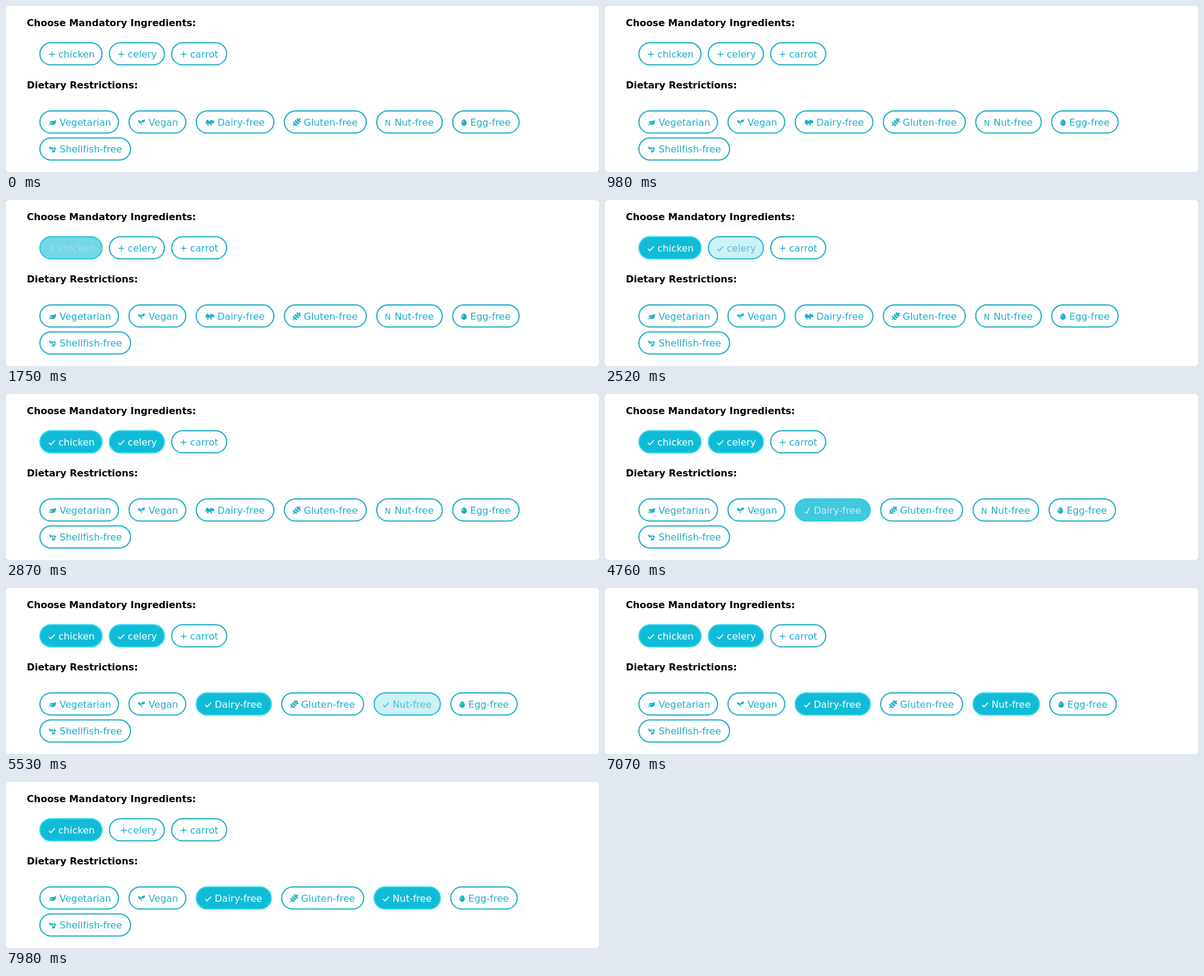
Write an HTML page that moves like this. It is 996 px wide and 280 px high and loops after 8 s.

```html
<!DOCTYPE html>
<html lang="en">
<head>
<meta charset="utf-8">
<title>Recipe filters</title>
<style>
  html, body { margin: 0; width: 100%; height: 100%; overflow: hidden; background: #999; }
  svg { display: block; width: 996px; height: 280px; }
  text { font: 16px "DejaVu Sans", Verdana, sans-serif; font-variant-ligatures: none; fill: currentColor; }
  .heading { font-weight: bold; fill: #000; }
  .icon { fill: currentColor; }
  .line { fill: none; stroke: currentColor; stroke-width: 1.3; }
</style>
</head>
<body>
<svg id="stage" viewBox="0 0 996 280">
  <rect width="996" height="280" rx="3" fill="#fff"/>
  <text class="heading" x="35" y="34">Choose Mandatory Ingredients:</text>
  <text class="heading" x="35" y="139">Dietary Restrictions:</text>
</svg>
<script>
const LOOP = 8000, STEP = 70;
const BLUE = [30, 174, 200], FILL = [16, 187, 214], GLOW = [50, 214, 238], WHITE = [255, 255, 255];
const PLUS = '<path class="line" d="M-5 0H5M0-5V5"/>';
const CHECK = '<path class="line" style="stroke-width:1.6" d="M-5 .8L-1.8 4L5-3.2"/>';

const grain = (x, y, turn) =>
  `<ellipse rx="2.5" ry="1.35" transform="translate(${x} ${y}) rotate(${turn})"/>`;

const ICONS = {
  plus: PLUS,
  leaf: '<path d="M5.7-4.8C6.6 1 4 4.2 0 4.2Q-2.4 4.2-3.6 3L-5.4 5-6.2 4.2Q-4 1 1.6.2Q-2.4-.3-4.9 1.4Q-5-2.4-.4-2.6Q4.2-2.4 5.7-4.8Z"/>',
  sprout: '<path d="M-6-3.8Q-.2-3.8 .6 1.2V5H-.7V1.3Q-5.8 1-6-3.8ZM6-5Q5.8-.2 1.2 .3Q.8-1.4-.5-2.5Q1-5 6-5Z"/>',
  cow: '<path d="M-5-4.6H2.6L4-3.6 6-3.8 7.5-.6 6.8 1.2H4.6L3.2 0V5H1V2.2H-2.4V5H-4.6V.8L-6 2.2H-7.2Q-7.2-4-5-4.6Z"/><path fill="#fff" d="M-2.4-4.6Q-2.4-2-.6-2T1-4.6Z"/>',
  wheat: '<path class="line" d="M-6 6L4-4"/>' + [-2.6, .4, 3.4].map(k =>
    grain(k - 1.7, -k - 1.7, 80) + grain(k + 1.7, -k + 1.7, 10)).join('') + grain(4.8, -4.8, -45),
  nut: '<text x="-6" y="5" style="font-size:13.5px">N</text>',
  egg: '<path d="M0-5.2C2.6-5.2 4.6-1.2 4.6 1.2A4.6 4.2 0 0 1-4.6 1.2C-4.6-1.2-2.6-5.2 0-5.2Z"/><path d="M-2.5 .8Q-2.2-2-.4-2.8" fill="none" stroke="#fff"/>',
  shrimp: '<path d="M-6-5H-4.8Q-4.6-3.8-3.4-3.8H1V.2H-1.5Q-5.2 0-6-5ZM2-3.8Q6.3-3.4 6-.2L2.4 .6ZM2 1.6L5.4 1Q4.4 4.8 .6 5.2L-1.8 3.6 .4 3.2-1.4 1.4Z"/><circle cx="-1.2" cy="-1.9" r=".8" fill="#fff"/>'
};

// w: width, tx: label offset, ix: icon offset; on/off: toggle times
const chip = (label, icon, w, tx, ix, extra) => ({ label, icon, w, tx, ix, ...extra });
const rows = [
  { y: 61, gap: 10.3, chips: [
    chip('chicken', 'plus', 106.3, 32, 21, { on: 1615 }),
    chip('celery', 'plus', 94.4, 32, 21, { on: 2455, off: 7780 }),
    chip('carrot', 'plus', 94.4, 32, 21)
  ]},
  { y: 176, gap: 15.6, chips: [
    chip('Vegetarian', 'leaf', 134, 34, 22),
    chip('Vegan', 'sprout', 97.3, 34, 22),
    chip('Dairy-free', 'cow', 132.4, 36.5, 24, { on: 4560, wOn: 128 }),
    chip('Gluten-free', 'wheat', 139.6, 33.5, 21.5),
    chip('Nut-free', 'nut', 112, 31, 20.5, { on: 5465, wOn: 113.2 }),
    chip('Egg-free', 'egg', 113.5, 30.5, 20)
  ]},
  { y: 221.5, gap: 15.6, chips: [chip('Shellfish-free', 'shrimp', 154.2, 34, 22)] }
];

const stage = document.getElementById('stage');
const make = (tag, attrs, parent) => {
  const el = document.createElementNS('http://www.w3.org/2000/svg', tag);
  set(el, attrs);
  return parent.appendChild(el);
};
function set(el, attrs) {
  for (const k in attrs) el.setAttribute(k, attrs[k]);
}

for (const row of rows) for (const c of row.chips) {
  c.group = make('g', {}, stage);
  c.box = make('rect', { x: 1, y: 1, height: 37.3, rx: 18.65, 'stroke-width': 2 }, c.group);
  c.mark = make('g', { class: 'icon' }, c.group);
  c.text = make('text', { y: 25.6 }, c.group);
  c.text.textContent = c.label;
}

const mix = (a, b, p) => `rgb(${a.map((v, i) => Math.round(v + (b[i] - v) * p))})`;

// cubic-bezier(.25, .1, .25, 1)
function ease(x) {
  if (x <= 0) return 0;
  if (x >= 1) return 1;
  let lo = 0, hi = 1;
  for (let i = 0; i < 20; i++) {
    const s = (lo + hi) / 2, u = 1 - s;
    if (.75 * u * u * s + .75 * u * s * s + s ** 3 < x) lo = s; else hi = s;
  }
  const u = 1 - lo;
  return .3 * u * u * lo + 3 * u * lo * lo + lo ** 3;
}

function drawChip(c, x, y, t) {
  const leaving = t >= c.off;
  const selected = t >= c.on && !leaving;
  const p = leaving ? 1 - ease((t - c.off) / 260) : selected ? ease((t - c.on) / 400) : 0;
  const w = selected && c.wOn || c.w;
  const swing = selected && p > .25 && p < .9 ? -45 * Math.sin(Math.PI * (p - .25) / .65) : 0;
  const ix = selected ? 21 : c.ix + (leaving ? 4 : 0);
  const mark = selected ? CHECK : ICONS[c.icon];

  set(c.group, { transform: `translate(${x} ${y})`, color: mix(BLUE, WHITE, p) });
  set(c.box, { width: w - 2, fill: mix(WHITE, FILL, p), stroke: mix(BLUE, GLOW, p) });
  set(c.mark, { transform: `translate(${ix} 20.5) rotate(${swing})` });
  set(c.text, { x: selected ? 32 : c.tx });
  if (c.shown !== mark) c.mark.innerHTML = c.shown = mark;
  return w;
}

function draw(t) {
  for (const row of rows) {
    let x = 56;
    for (const c of row.chips) x += drawChip(c, x, row.y, t) + row.gap;
  }
}

const start = performance.now();
function tick() {
  const t = (performance.now() - start) % LOOP;
  draw(Math.floor(t / STEP) * STEP);
  requestAnimationFrame(tick);
}
tick();
</script>
</body>
</html>
```
